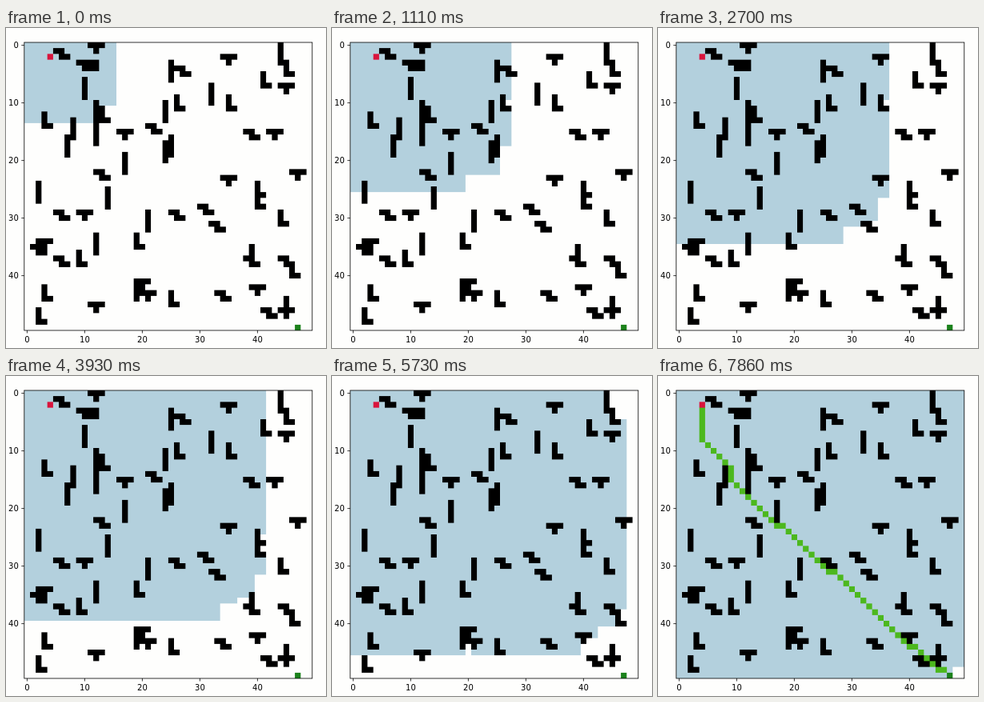
Animation of 400 by 400 pixels, one loop 8.97 s. Source, as an HTML page with a canvas:

```html
<!DOCTYPE html>
<html lang="en">
<head>
<meta charset="utf-8">
<title>Breadth-first search</title>
<style>
  html, body { margin: 0; width: 100%; height: 100%; overflow: hidden; background: #fefefd; }
  canvas { display: block; width: 100vw; height: 100vh; }
</style>
</head>
<body>
<canvas id="plot" width="400" height="400"></canvas>
<script>
const N = 50, CELL = 7.2, SIZE = N * CELL, LEFT = 22.8, TOP = 18;
const LOOP = 8970, FRAME = 30, PATH_AT = 7770;
const PAPER = '#fefefd', BLUE = '#b3d0dd', RED = '#d9143c', GOAL = '#1b821b', TRAIL = '#4cb81e';
const START = [4, 2], END = [47, 49];

// Depth at the first moment, depth before the path shows, and growth in between
const FIRST = 11, LAST = 48, POWER = 2.5, PACE = 0.4685;

// A step costs 100; the extra for diagonals only settles ties
const STRAIGHT = 100, DIAGONAL = 101;

const SHAPES = { I: '#/#/#/#', L: '#/#/##', Z: '##/.##', T: '###/.#', O: '##/##' };

// Top-left cell of every block
const BLOCKS = {
  I: [[10, 6], [12, 10], [12, 14], [8, 13], [7, 16], [24, 10], [25, 3], [32, 7], [44, 0], [24, 17],
      [25, 16], [17, 19], [14, 25], [2, 24], [21, 29], [12, 33], [19, 41], [39, 35], [45, 44]],
  L: [[13, 11], [3, 12], [26, 9], [35, 9], [41, 5], [45, 3], [40, 24], [40, 26], [44, 29], [19, 33],
      [9, 36], [3, 42], [2, 46], [25, 43], [46, 38]],
  Z: [[5, 1], [9, 3], [21, 14], [26, 4], [38, 15], [12, 22], [5, 29], [25, 29], [30, 28], [32, 31],
      [1, 35], [5, 37], [33, 43], [38, 37], [44, 37], [41, 46]],
  T: [[11, 0], [16, 15], [34, 2], [44, 7], [42, 15], [9, 29], [34, 23], [46, 22], [2, 34], [11, 45],
      [19, 41], [20, 43], [39, 42], [44, 46]],
  O: [[11, 3]]
};

const id = (x, y) => y * N + x;

function buildWalls() {
  const walls = new Set();
  for (const kind in BLOCKS) {
    const rows = SHAPES[kind].split('/');
    for (const [x, y] of BLOCKS[kind]) {
      rows.forEach((row, dy) => [...row].forEach((mark, dx) => {
        if (mark === '#') walls.add(id(x + dx, y + dy));
      }));
    }
  }
  return walls;
}

// The eight cells around one, left column first, with the cost of the step
function neighbours(x, y) {
  const list = [];
  for (let u = x - 1; u <= x + 1; u++) {
    for (let v = y - 1; v <= y + 1; v++) {
      const inside = u >= 0 && v >= 0 && u < N && v < N;
      if (!inside || (u === x && v === y)) continue;
      list.push([u, v, u !== x && v !== y ? DIAGONAL : STRAIGHT]);
    }
  }
  return list;
}

// Breadth-first search that ends when the goal is found
function search() {
  const cost = new Array(N * N).fill(Infinity);
  const queue = [START];
  cost[id(...START)] = 0;
  for (const [x, y] of queue) {
    for (const [u, v, step] of neighbours(x, y)) {
      const k = id(u, v);
      if (walls.has(k)) continue;
      if (cost[k] === Infinity) queue.push([u, v]);
      cost[k] = Math.min(cost[k], cost[id(x, y)] + step);
    }
    if (cost[id(...END)] < Infinity) break;
  }
  return cost;
}

function tracePath() {
  const path = [];
  let at = END;
  while (at && cost[id(...at)] > 0) {
    path.push(at);
    const here = cost[id(...at)];
    const prev = neighbours(...at).find(([u, v, step]) => cost[id(u, v)] + step === here);
    at = prev && prev.slice(0, 2);
  }
  return path;
}

const walls = buildWalls();
const cost = search();
const path = tracePath();

function depthAt(t) {
  if (t >= PATH_AT) return N + FIRST;
  const depth = (t / PACE + FIRST ** POWER) ** (1 / POWER);
  return Math.min(LAST, Math.floor(depth + 1e-6));
}

// The grid is painted five times larger, so that its edges scale down smoothly
const UNIT = CELL * 5;
const sheet = document.createElement('canvas');
sheet.width = sheet.height = N * UNIT;
const grid = sheet.getContext('2d');
const ctx = document.getElementById('plot').getContext('2d');
ctx.imageSmoothingQuality = 'high';

function cell(x, y, color) {
  grid.fillStyle = color;
  grid.fillRect(x * UNIT, y * UNIT, UNIT, UNIT);
}

function drawGrid(depth, solved) {
  for (let y = 0; y < N; y++) {
    for (let x = 0; x < N; x++) {
      const k = id(x, y);
      const reached = Math.floor(cost[k] / STRAIGHT) <= depth;
      cell(x, y, walls.has(k) ? '#000' : reached ? BLUE : PAPER);
    }
  }
  if (solved) for (const [x, y] of path) cell(x, y, TRAIL);
  cell(...START, RED);
  cell(...END, GOAL);
}

function drawAxes() {
  const right = LEFT + SIZE, bottom = TOP + SIZE;
  ctx.strokeStyle = ctx.fillStyle = '#000';
  ctx.lineWidth = 0.8;
  ctx.strokeRect(LEFT, TOP, right - LEFT, bottom - TOP);
  ctx.font = '10px "DejaVu Sans", sans-serif';
  for (let n = 0; n < N; n += 10) {
    const x = LEFT + (n + 0.5) * CELL, y = TOP + (n + 0.5) * CELL;
    ctx.beginPath();
    ctx.moveTo(x, bottom);
    ctx.lineTo(x, bottom + 3.5);
    ctx.moveTo(LEFT - 3.5, y);
    ctx.lineTo(LEFT, y);
    ctx.stroke();
    ctx.textAlign = 'center';
    ctx.fillText(n, x, bottom + 14.5);
    ctx.textAlign = 'right';
    ctx.fillText(n, LEFT - 7, y + 3.7);
  }
}

let shown = '';
function draw(t) {
  const depth = depthAt(t), solved = t >= PATH_AT;
  const state = depth + ' ' + solved;
  if (state === shown) return;
  shown = state;
  drawGrid(depth, solved);
  ctx.fillStyle = PAPER;
  ctx.fillRect(0, 0, 400, 400);
  ctx.drawImage(sheet, LEFT, TOP, SIZE, SIZE);
  drawAxes();
}

const begin = performance.now();
function tick() {
  const t = (performance.now() - begin) % LOOP;
  draw(Math.floor(t / FRAME) * FRAME);
  requestAnimationFrame(tick);
}
tick();
</script>
</body>
</html>
```
